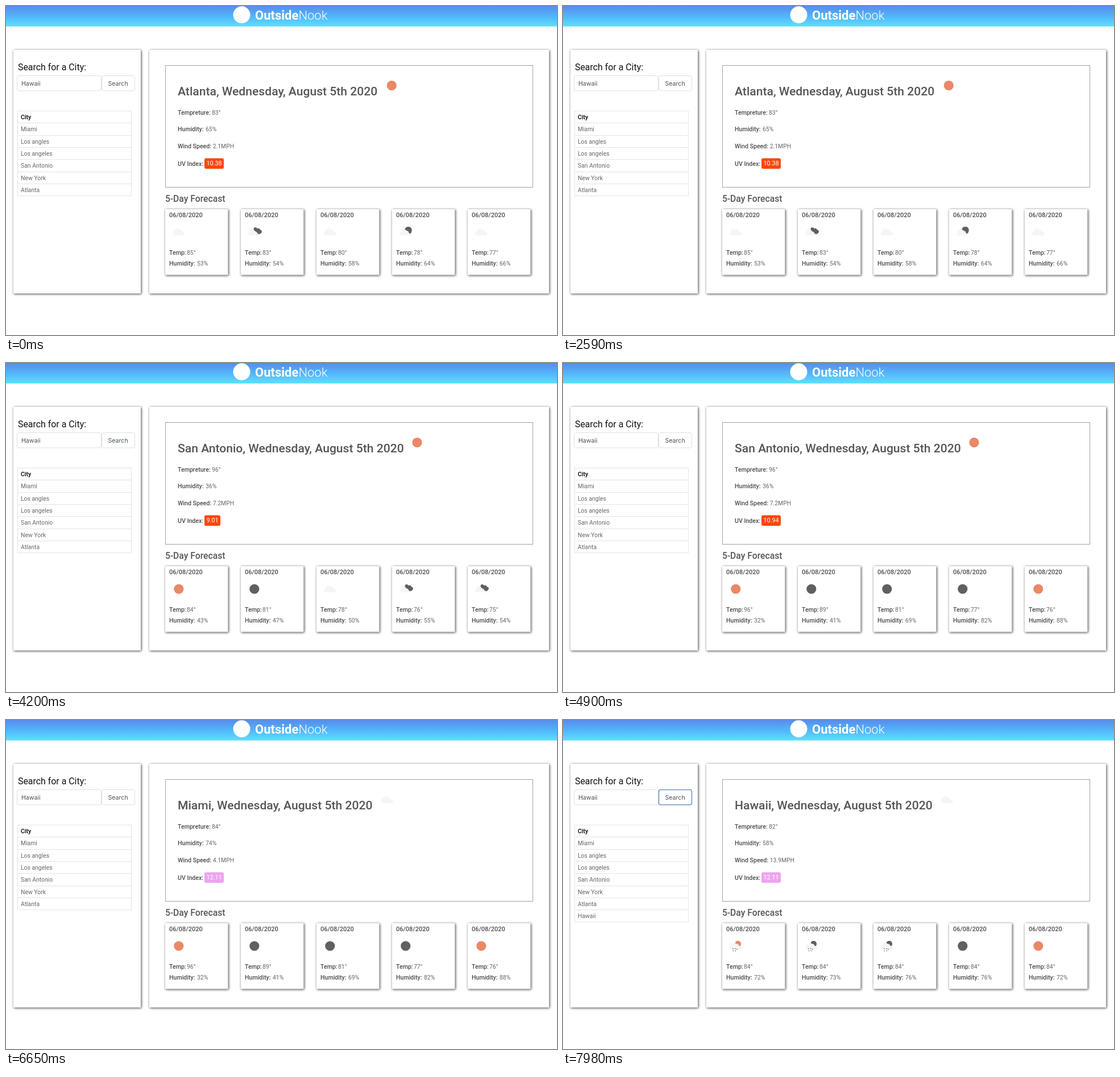
An HTML page that plays this animation: 969 px wide and 578 px high, repeating every 8000 ms.

```html
<!DOCTYPE html>
<html lang="en">
<head>
<meta charset="utf-8">
<title>Weather dashboard</title>
<style>
  html, body { margin: 0; width: 100%; height: 100%; overflow: hidden; background: #fff; }
  svg { display: block; }
  text { font: 400 10.4px Roboto, sans-serif; fill: #666; white-space: pre; }
  .label { font-weight: 500; font-size: 10.6px; fill: #4c4c4c; }
  .title { font-weight: 500; font-size: 21.1px; fill: #555; }
  .section { font-weight: 500; font-size: 15.7px; fill: #555; }
  .heading { font-size: 15.9px; fill: #111; }
  .head { font-weight: 700; fill: #222; }
  .date { font-weight: 500; font-size: 11px; fill: #4c4c4c; }
  .badge { font-size: 10.8px; fill: #fff; }
  .control { font: 400 10.6px Inter, sans-serif; fill: #495057; }
  .brand { font-size: 22px; font-weight: 300; fill: #fff; }
  .brand tspan { font-weight: 700; }
  .panel { fill: #fff; filter: drop-shadow(1.5px 1.5px 2px #0008) drop-shadow(0 0 .7px #0008); }
  .line { fill: none; stroke: #e2e4e6; }
  .field { fill: #fff; stroke: #dcdfe2; }
  .focus { stroke: #7196c4; stroke-width: 1.6; }
</style>
</head>
<body>
<svg width="969" height="578" viewBox="0 0 969 578">
  <defs>
    <linearGradient id="sky" x2="0" y2="1">
      <stop stop-color="#588cea"/>
      <stop offset=".5" stop-color="#52b5fb"/>
      <stop offset="1" stop-color="#5fe0ff"/>
    </linearGradient>
  </defs>
  <rect width="969" height="36" fill="url(#sky)"/>
  <circle cx="414.5" cy="15.5" r="15" fill="#fff"/>
  <text class="brand" x="438" y="24"><tspan>Outside</tspan>Nook</text>
  <rect class="panel" x="13" y="77" width="224" height="428"/>
  <rect class="panel" x="252" y="77" width="703" height="428"/>
  <rect x="280.5" y="104.5" width="646" height="214" fill="none" stroke="#a2a2a2"/>
  <text class="heading" x="21" y="112.5">Search for a City:</text>
  <text class="section" x="280" y="344">5-Day Forecast</text>
  <g id="search"></g>
  <g id="cities"></g>
  <g id="today"></g>
  <g id="forecast"></g>
</svg>
<script>
const LOOP = 8000, CORAL = '#ea8868', DARK = '#606062';
const byId = id => document.getElementById(id);
const text = (x, y, value, kind = '') => `<text class="${kind}" x="${x}" y="${y}">${value}</text>`;
const rect = (x, y, w, h, attrs) => `<rect x="${x}" y="${y}" width="${w}" height="${h}" ${attrs}/>`;

const cloud = '<path d="M-9 6a4 4 0 0 1 1-7a5 5 0 0 1 9-3a5 5 0 0 1 6 4a3 3 0 0 1 1 6z" fill="#f5f5f5"/>';
const disc = color => `<circle r="8.6" fill="${color}"/>`;
const rain = color => cloud +
  `<path d="M-1-6a5.4 5.4 0 0 1 10 4q-1 3-3 2q-1-4-6-4z" fill="${color}"/>` +
  `<path d="M-5 4v1.6M-1 4v1.6M2 5v1.6M-4 8l-1 1M0 8l-1 1" stroke="${DARK}" stroke-width="1.5"/>`;
const icons = {
  sun: disc(CORAL),
  moon: disc(DARK),
  cloud,
  broken: cloud + `<path d="M-1-7a4 4 0 0 1 6 1a3.4 3.4 0 0 1 5 2a3.4 3.4 0 0 1 2 6q-3 3-6 1q-1-3-4-4q-4-2-3-6z" fill="${DARK}"/>`,
  few: cloud + `<path d="M-1-6a6.5 6.5 0 0 1 12 2q0 5-3 7q-3-1-3-4q-3-1-6-3z" fill="${DARK}"/>`,
  rainDay: rain(CORAL),
  rainNight: rain(DARK)
};
const icon = (name, x, y) => `<g transform="translate(${x} ${y})">${icons[name]}</g>`;

const cities = ['Miami', 'Los angles', 'Los angeles', 'San Antonio', 'New York', 'Atlanta', 'Hawaii'];

// [start, city, temperature, humidity, wind, icon, icon x]
const reports = [
  [0, 'Atlanta', 83, 65, 2.1, 'sun', 678.3],
  [2870, 'New York', 84, 50, 5.8, 'sun', 693],
  [4130, 'San Antonio', 96, 36, 7.2, 'sun', 723],
  [6510, 'Miami', 84, 74, 4.1, 'cloud', 670],
  [7910, 'Hawaii', 82, 58, 13.9, 'cloud', 675]
];
// [start, index]
const uvSteps = [[0, '10.38'], [3080, '9.01'], [4340, '10.94'], [6580, '12.11']];
// [start, days as "icon temperature humidity"]
const forecasts = [
  [0, 'cloud 85 53', 'broken 83 54', 'cloud 80 58', 'few 78 64', 'cloud 77 66'],
  [3150, 'sun 84 43', 'moon 81 47', 'cloud 78 50', 'broken 76 55', 'broken 75 54'],
  [4410, 'sun 96 32', 'moon 89 41', 'moon 81 69', 'moon 77 82', 'sun 76 88'],
  [6790, 'rainDay 84 72', 'rainNight 84 73', 'rainNight 84 76', 'moon 84 76', 'sun 84 72']
];
const focusSteps = [[0, ''], [630, 'input'], [2240, ''], [7700, 'button']];

const current = (steps, time) => steps.findLast(([start]) => time >= start);

function drawSearch(focus, caret) {
  const mark = name => `rx="3" class="field ${focus === name ? 'focus' : ''}"`;
  return rect(19.5, 122.5, 148, 26.5, mark('input')) +
    rect(168.5, 122.5, 58, 26.5, mark('button')) +
    text(27, 139.5, 'Hawaii', 'control') + text(179.5, 139.5, 'Search', 'control') +
    (caret ? '<path d="M60.5 129v13" stroke="#333"/>' : '');
}

function drawCities(count) {
  const step = 21.3;
  let out = rect(20.5, 184.5, 200, step * (count + 1), 'class="line"') + text(26, 199, 'City', 'head');
  for (let i = 1; i <= count; i++) {
    out += `<path class="line" d="M20 ${Math.round(184 + i * step) + .5}h200"/>` +
      text(26, 199 + i * step, cities[i - 1]);
  }
  return out;
}

function drawToday([, city, temp, humidity, wind, sky, iconX], uv) {
  const color = uv > 11 ? '#eda3f0' : '#fb470c';
  return text(302, 157, `${city}, Wednesday, August 5th 2020`, 'title') + icon(sky, iconX, 139.7) +
    text(302, 190.5, 'Tempreture:', 'label') + text(362, 190.5, temp + '°') +
    text(302, 220, 'Humidity:', 'label') + text(351, 220, humidity + '%') +
    text(302, 249.5, 'Wind Speed:', 'label') + text(363.7, 249.5, wind + 'MPH') +
    text(302, 281, 'UV Index:', 'label') +
    rect(349, 267.5, uv.length > 4 ? 34 : 28, 18.5, `rx="3" fill="${color}"`) +
    text(352.5, 280.3, uv, 'badge');
}

function drawForecast([, ...days]) {
  return days.map((day, i) => {
    const [sky, temp, humidity] = day.split(' ');
    const x = 280 + i * 133;
    return rect(x, 357, 110.5, 115.5, 'class="panel"') +
      text(x + 7, 371.3, '06/08/2020', 'date') + icon(sky, x + 23.8, 397) +
      text(x + 7, 437, 'Temp:', 'label') + text(x + 38, 437, temp + '°') +
      text(x + 7, 456, 'Humidity:', 'label') + text(x + 56, 456, humidity + '%');
  }).join('');
}

const shown = {};
function show(id, markup) {
  if (shown[id] !== markup) byId(id).innerHTML = shown[id] = markup;
}

function render(now) {
  const time = now % LOOP;
  const [focusStart, focus] = current(focusSteps, time);
  const caret = focus === 'input' && (time - focusStart) % 1000 < 500;
  const report = current(reports, time);
  show('search', drawSearch(focus, caret));
  show('cities', drawCities(report[1] === 'Hawaii' ? 7 : 6));
  show('today', drawToday(report, current(uvSteps, time)[1]));
  show('forecast', drawForecast(current(forecasts, time)));
}

const began = performance.now();
function tick() {
  render(performance.now() - began);
  requestAnimationFrame(tick);
}
tick();
</script>
</body>
</html>
```
